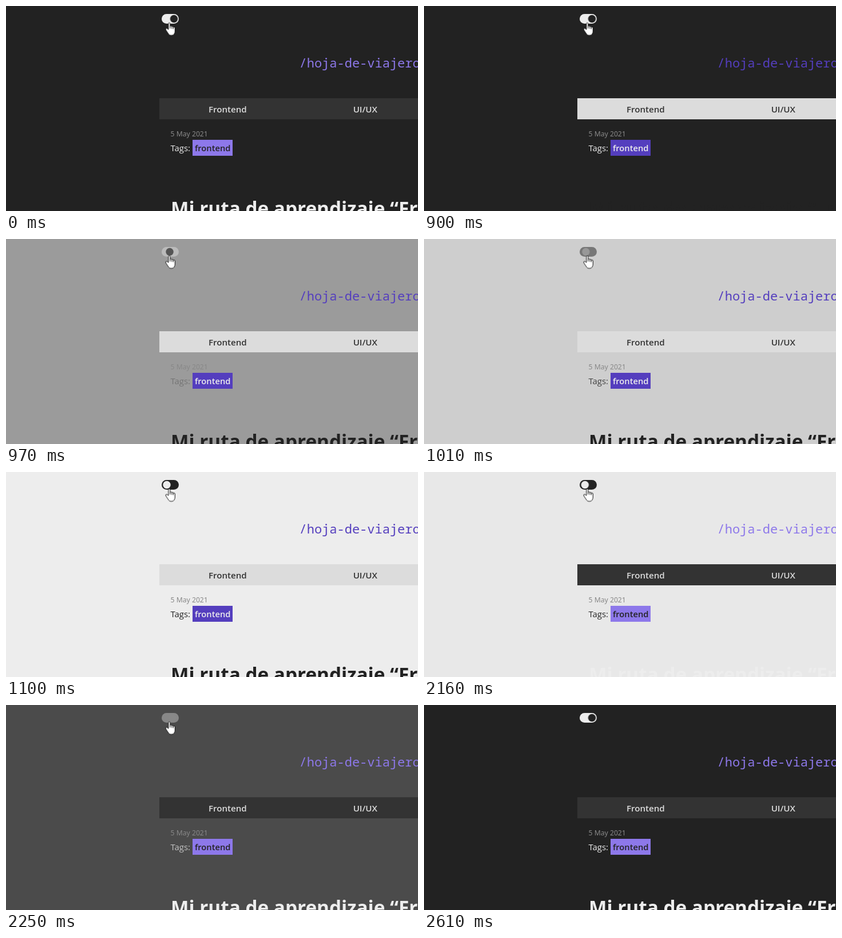
An HTML page for the animation above (4.56 s loop, 720 by 360 pixels).

```html
<!DOCTYPE html>
<html lang="es">
<head>
<meta charset="utf-8">
<title>Theme switch</title>
<style>
  html, body { margin: 0; width: 100%; height: 100%; overflow: hidden; background: #222; }
  svg { display: block; width: 720px; height: 360px; }
  text { font-family: "Open Sans", "Noto Sans", sans-serif; }
  .semi { font-weight: 600; text-anchor: middle; }
  .site { font: 22px "Noto Sans Mono", monospace; }
  .title { font-weight: 700; font-size: 33.3px; }
  .date { font: 12.2px "Noto Sans", sans-serif; fill: #888; }
</style>
</head>
<body>
<svg viewBox="0 0 720 360">
  <rect class="page" width="720" height="360"/>

  <rect class="track" x="272" y="14" width="30" height="17" rx="8.5"/>
  <circle class="knob" cx="281" cy="22.5" r="6.7"/>

  <text class="site accent" x="512.5" y="108">/hoja-de-viajero</text>

  <rect class="nav" x="268" y="162" width="452" height="37"/>
  <g class="semi link" font-size="15.1">
    <text x="387.4" y="187">Frontend</text>
    <text x="627.8" y="187">UI/UX</text>
  </g>

  <text class="date" x="287.5" y="229">5 May 2021</text>
  <text class="body" x="287.5" y="255" font-size="14.9">Tags:</text>
  <rect class="accent" x="326" y="235" width="70" height="28"/>
  <text class="semi tag" x="361.2" y="255" font-size="14.7">frontend</text>

  <text class="title" x="288" y="367.5">Mi ruta de aprendizaje “Fr</text>

  <path class="hand" transform="translate(278.8 29.5)" fill="#fff" stroke="#111" stroke-linejoin="round"
    d="M5 12V1.5Q5 0 6.5 0T8 1.5V6.5Q8 5.5 9.5 5.5T11 7Q11 6.3 12.3 6.3T13.7 8Q13.7 7.4 15 7.4T16.5 9V15Q16.5 18 14.8 20Q13.5 22 11 22H9Q6.8 22 5.5 20L.8 13Q-.6 10.5 1 9.8T5 12ZM8 6.5V10M11 7V10.5M13.7 8V11"/>
</svg>
<script>
  const LOOP = 4560, FADE = 197;
  const INK = "#222", PAPER = "#ededed";

  const play = (selector, frames) =>
    document.querySelectorAll(selector).forEach(el =>
      el.animate(frames, { duration: LOOP, iterations: Infinity }));

  // Hard switch between the two themes
  const swap = (selector, dark, light) => play(selector, [
    { fill: dark, offset: 0, easing: "step-end" },
    { fill: light, offset: 900 / LOOP, easing: "step-end" },
    { fill: dark, offset: 2160 / LOOP, easing: "step-end" },
    { fill: dark, offset: 1 }
  ]);

  // Eased transition to the light theme and back
  function fade(selector, prop, dark, light, easing = "ease") {
    const key = (at, value) => ({ [prop]: value, offset: at / LOOP, easing });
    play(selector, [
      key(0, dark),
      key(903, dark), key(903 + FADE, light),
      key(2153, light), key(2153 + FADE, dark),
      key(LOOP, dark)
    ]);
  }

  swap(".accent", "#8d78ea", "#543ebe");
  swap(".nav", "#333", "#dcdcdc");
  swap(".link", "#dcdcdc", "#333");
  swap(".tag", INK, PAPER);
  swap(".title", PAPER, INK);

  fade(".page", "fill", INK, PAPER);
  fade(".body", "fill", PAPER, INK);
  fade(".track", "fill", PAPER, INK, "ease-in-out");
  fade(".knob", "fill", INK, PAPER, "ease-in-out");
  fade(".knob", "transform", "translateX(12.5px)", "translateX(0px)");

  play(".hand", [
    { opacity: 1, offset: 0, easing: "step-end" },
    { opacity: 0, offset: 2610 / LOOP },
    { opacity: 0, offset: 1 }
  ]);
</script>
</body>
</html>
```
